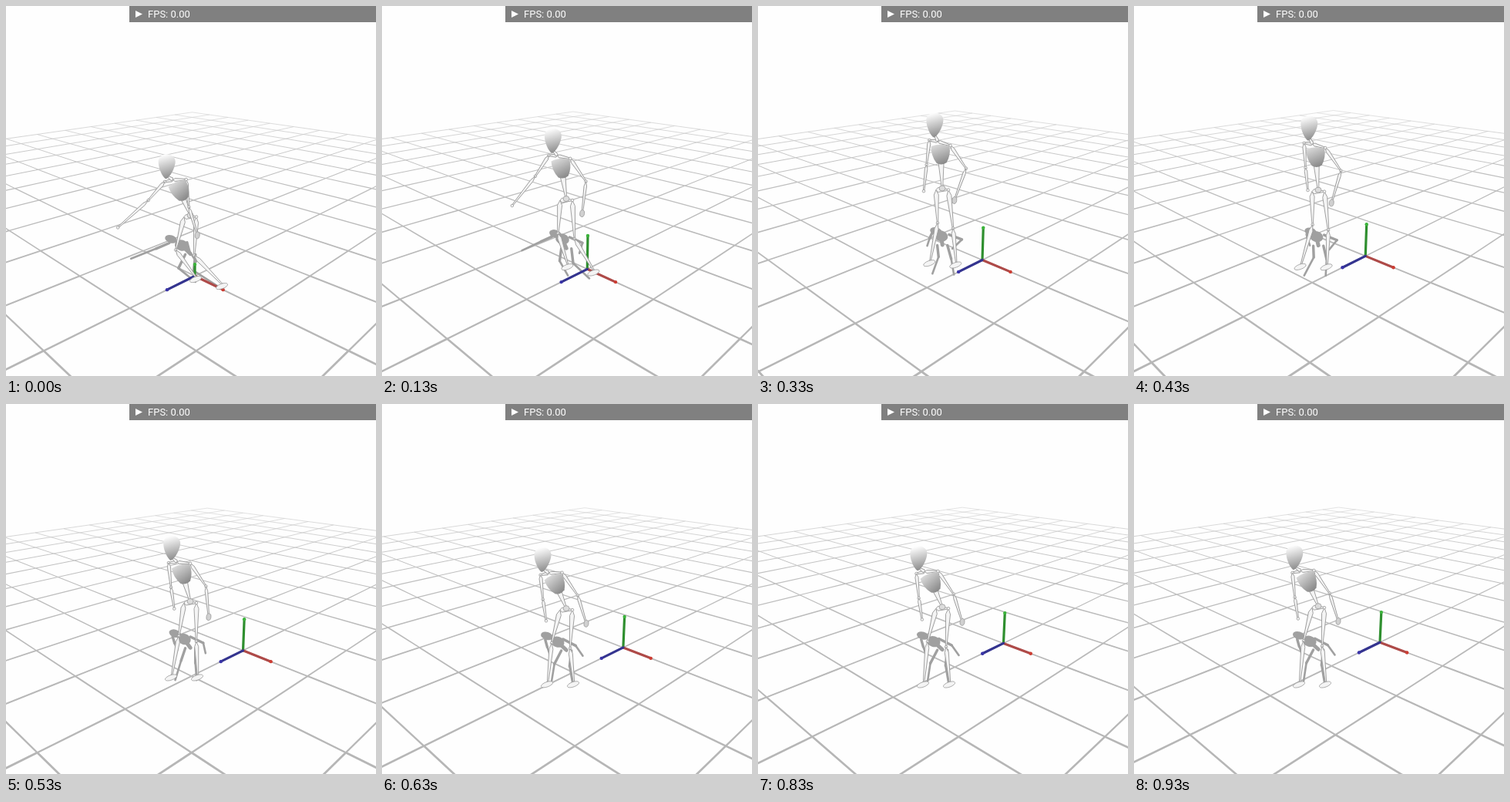
These frames come from a looping animation (480 px wide and 480 px high, 0.96 s). An HTML page with a canvas:

```html
<!DOCTYPE html>
<html>
<head>
<meta charset="utf-8">
<style>
html, body { margin: 0; width: 100%; height: 100%; overflow: hidden; background: #fefefe; }
canvas { display: block; }
</style>
</head>
<body>
<canvas id="stage" width="480" height="480"></canvas>
<script>
const ctx = document.getElementById('stage').getContext('2d');
const STEP = 100 / 3, LOOP = 960, LAST = 28;
const EDGE = '#9b9b9b', BONE = '#f4f4f4', SHADOW = '#a0a0a0';

const mix = (a, b, u) => a + (b - a) * u;
const clamp = u => Math.min(Math.max(u, 0), 1);
const smooth = u => (u = clamp(u)) * u * (3 - 2 * u);
const easeOut = (k, power) => 1 - (1 - k / LAST) ** power;
const shift = ([x, y], dx, dy) => [x + dx, y + dy];
// Angles run from straight down, positive towards the left
const swingFrom = (p, length, angle) => shift(p, -length * Math.sin(angle), length * Math.cos(angle));

// Camera looks along the ground diagonal at a fixed pitch; one grid cell is 1 unit
const FOCAL = 579.4, HEIGHT = 2.694, COS = 0.951, SIN = 0.31, HORIZON = 51;

function makeCamera([ox, oy]) {
  const depth = FOCAL * HEIGHT / COS / (oy - HORIZON);
  const x0 = (ox - 240) * depth / FOCAL, z0 = (depth - HEIGHT * SIN) / COS;
  return (a, b, up = 0) => {
    const x = x0 + (a - b) * Math.SQRT1_2, z = z0 - (a + b) * Math.SQRT1_2, drop = HEIGHT - up;
    const d = z * COS + drop * SIN;
    return [240 + FOCAL * x / d, 240 + FOCAL * (drop * COS - z * SIN) / d, d];
  };
}

function line(p, q, width, color) {
  ctx.strokeStyle = color;
  ctx.lineWidth = width;
  ctx.beginPath();
  ctx.moveTo(p[0], p[1]);
  ctx.lineTo(q[0], q[1]);
  ctx.stroke();
}

function drawGrid(project) {
  const segment = (p, q) => {
    const depth = (p[2] + q[2]) / 2;
    const gray = mix(182, 205, clamp((depth - 4) / 14));
    if (p[2] > 1 && q[2] > 1) line(p, q, 10.5 / depth, `rgb(${gray}, ${gray}, ${gray})`);
  };
  for (let i = -10; i <= 10; i++)
    for (let j = -10; j < 10; j++) {
      segment(project(i, j), project(i, j + 1));
      segment(project(j, i), project(j + 1, i));
    }
}

function drawAxes(project, upright) {
  const axis = (tip, color, tipColor) => {
    const from = project(0, 0), to = project(...tip);
    line(from, to, 3.2, color);
    line(to, to, 4.4, tipColor);
  };
  ctx.lineCap = 'round';
  axis([0, 0, upright], '#2f8f2f', '#3cb43c');
  axis([0.46, 0], '#ae4a48', '#cc3d33');
  axis([0, 0.46], '#34348f', '#3a34a8');
  ctx.lineCap = 'butt';
}

function ellipse(p, rx, ry, angle, fill, stroke) {
  ctx.beginPath();
  ctx.ellipse(p[0], p[1], rx, ry, angle, 0, 7);
  ctx.fillStyle = fill;
  ctx.fill();
  if (stroke) {
    ctx.strokeStyle = stroke;
    ctx.lineWidth = 0.8;
    ctx.stroke();
  }
}

// Tapered bone, widest near its upper joint
function bone(p, q, width) {
  const dx = q[0] - p[0], dy = q[1] - p[1], len = Math.hypot(dx, dy);
  ctx.save();
  ctx.translate(p[0], p[1]);
  ctx.rotate(Math.atan2(dy, dx));
  ctx.beginPath();
  ctx.moveTo(0, 0);
  ctx.lineTo(len * 0.15, -width);
  ctx.lineTo(len, -0.7);
  ctx.lineTo(len, 0.7);
  ctx.lineTo(len * 0.15, width);
  ctx.closePath();
  ctx.fillStyle = BONE;
  ctx.fill();
  ctx.strokeStyle = EDGE;
  ctx.lineWidth = 0.9;
  ctx.stroke();
  ctx.restore();
  ellipse(q, 1.8, 1.8, 0, BONE, EDGE);
}

function solid(p, angle, outline, light, dark) {
  const g = ctx.createLinearGradient(-5, -14, 5, 15);
  g.addColorStop(0, light);
  g.addColorStop(1, dark);
  ctx.save();
  ctx.translate(p[0], p[1]);
  ctx.rotate(angle);
  ctx.fillStyle = g;
  ctx.fill(new Path2D(outline));
  ctx.restore();
}

// The figure rises from a crouch and sinks again while its left arm swings in
function pose(k) {
  const rise = Math.exp(-(((k - 9.3) / 6.5) ** 4));
  const swing = smooth(k / 15), open = clamp(k / 4);

  const pelvis = [239, 272 - 0.35 * k - 32 * rise];
  const chest = shift(pelvis, -14 + 12 * rise, -33 - 13 * rise);
  const head = shift(pelvis, -31 + 21 * rise, -63 - 19 * rise);
  const lean = Math.atan2(pelvis[0] - chest[0], pelvis[1] - chest[1]);
  const onChest = (x, y) =>
    shift(chest, x * Math.cos(lean) + y * Math.sin(lean), y * Math.cos(lean) - x * Math.sin(lean));

  const shoulderL = onChest(-14, -17), shoulderR = onChest(13, -9);
  const elbowL = swingFrom(shoulderL, 32, mix(0.72, -0.1, swing));
  const handL = swingFrom(elbowL, mix(53, 28, swing), mix(0.84, -0.15, swing));
  const elbowR = swingFrom(shoulderR, 36, mix(-0.1, -0.6, open));
  const handR = swingFrom(elbowR, 38 + 6 * rise, -0.3 + 0.65 * rise);

  const footR = [mix(281, 249, swing), 362 - 28 * rise];
  const footL = shift(footR, -34, mix(-9, 0, swing));
  const kneeL = shift(pelvis, -19 + 13 * rise, 45), kneeR = shift(pelvis, 5 + 9 * rise, 52);
  return {
    head, chest, pelvis, lean, handR, footL, footR,
    neck: onChest(-3, -15),
    armL: [shoulderL, elbowL, handL],
    armR: [shoulderR, elbowR, handR],
    legL: [shift(pelvis, -8, 2), kneeL, footL],
    legR: [shift(pelvis, 8, 2), kneeR, footR]
  };
}

function drawShadow(f) {
  const cast = ([x, y]) => {
    const d = y - 198;
    return [240 + (x - 240) * 0.82, 300 + 0.22 * d + 0.001 * d * d];
  };
  ctx.lineCap = 'round';
  for (const [a, b, c] of [f.armL, f.armR, f.legL, f.legR]) {
    line(cast(a), cast(b), 3.4, SHADOW);
    line(cast(b), cast(c), 2.6, SHADOW);
  }
  line(cast(f.chest), cast(f.pelvis), 5, SHADOW);
  ctx.lineCap = 'butt';
  ellipse(cast(f.head), 8, 5, 0.3, SHADOW);
  ellipse(cast(f.chest), 9, 7, 0.3, SHADOW);
}

function drawFigure(f) {
  const limb = ([a, b, c], width) => {
    bone(a, b, width);
    bone(b, c, width * 0.85);
  };
  limb(f.legR, 3);
  limb(f.legL, 3);
  for (const foot of [f.footL, f.footR]) ellipse(shift(foot, -1, 2), 8, 3.2, -0.35, BONE, EDGE);
  bone(f.chest, f.pelvis, 4);
  bone(f.legL[0], f.legR[0], 3);
  ellipse(f.pelvis, 4, 3.5, 0, '#dcdcdc', EDGE);
  limb(f.armR, 2.1);
  ellipse(f.handR, 3, 4.5, 0.2, '#d0d0d0', EDGE);
  bone(f.neck, f.armR[0], 2);
  bone(f.neck, f.armL[0], 2);
  solid(f.chest, -f.lean, 'M-12-9Q0-13 12-8Q13 4 7 13Q0 17-6 13Q-13 3-12-9Z', '#e2e2e2', '#858585');
  limb(f.armL, 2.1);
  bone(f.neck, shift(f.head, 0, 12), 2);
  solid(f.head, 0.06, 'M-11-7C-10-19 10-19 11-7C11 3 4 15 0 16C-4 15-11 3-11-7Z', '#fcfcfc', '#8a8a8a');
}

function drawBar() {
  ctx.fillStyle = '#808080';
  ctx.fillRect(160, 0, 320, 21);
  ctx.fillStyle = '#fff';
  ctx.fill(new Path2D('M168 6L177 10.5L168 15Z'));
  ctx.font = '13px Roboto, sans-serif';
  ctx.fillText('FPS: 0.00', 184, 15);
}

function render(time) {
  const k = Math.floor((time + 3.4) / STEP);
  const project = makeCamera([mix(245, 319, easeOut(k, 2.2)), mix(350, 309, easeOut(k, 1.6))]);
  const figure = pose(k);
  ctx.fillStyle = '#fefefe';
  ctx.fillRect(0, 0, 480, 480);
  drawGrid(project);
  drawShadow(figure);
  drawAxes(project, mix(0.16, 0.46, clamp(k / 4)));
  drawFigure(figure);
  drawBar();
}

const start = performance.now();
function tick() {
  render((performance.now() - start) % LOOP);
  requestAnimationFrame(tick);
}
tick();
</script>
</body>
</html>
```
